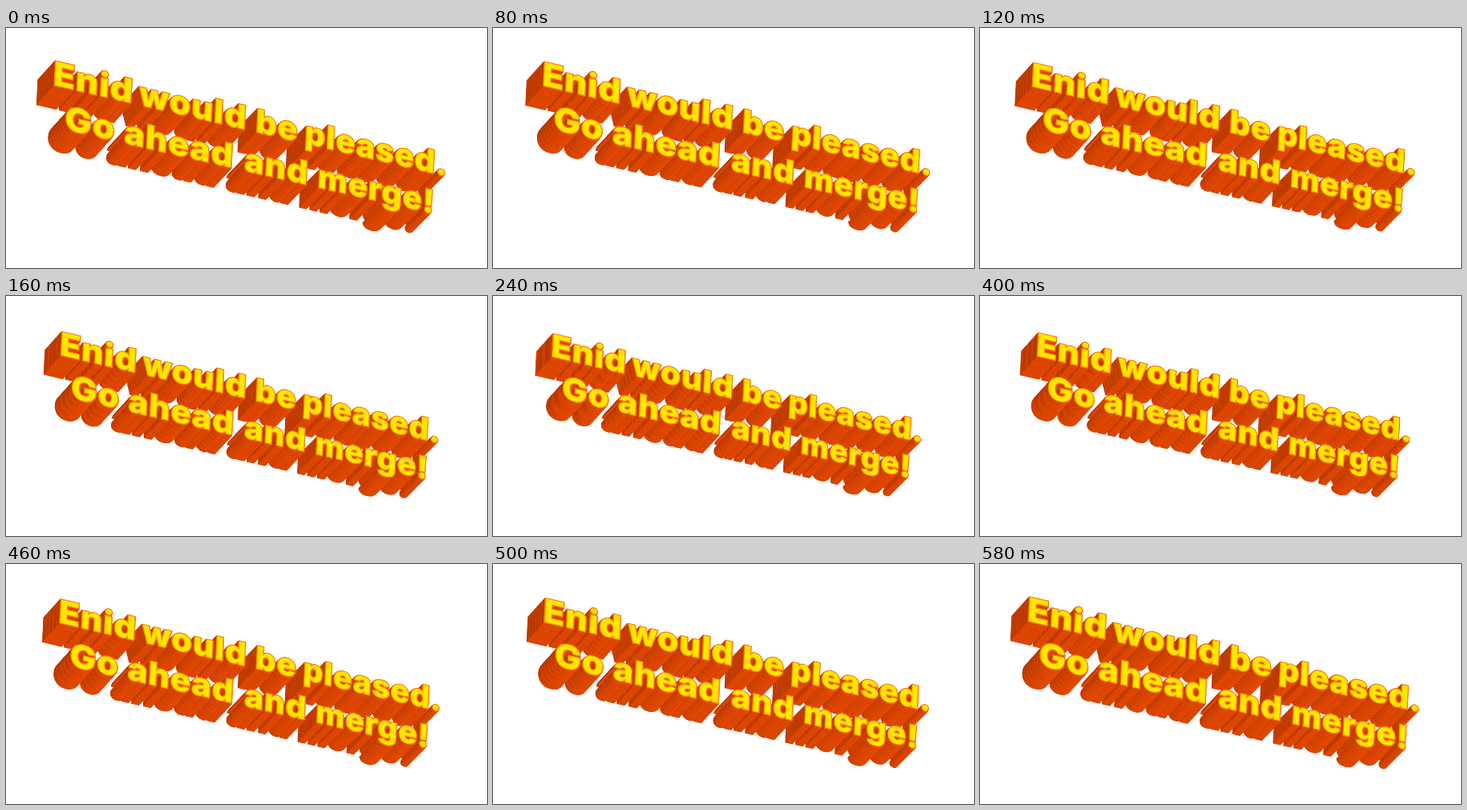
Animation of 600x300 px, one loop 0.6 s. Source, as an HTML page with a canvas:

```html
<!DOCTYPE html>
<html lang="en">
<head>
<meta charset="utf-8">
<title>Go ahead and merge!</title>
<style>
  html, body { margin: 0; width: 100%; height: 100%; overflow: hidden; background: #fff; }
  canvas { display: block; }
</style>
</head>
<body>
<canvas id="stage" width="600" height="300"></canvas>
<script>
const W = 600, H = 300;
const LOOP = 600, STEP = 20;
const LAYERS = 40;
const FACE = '#ffe600', RIM = '#fc8200', LIT = '#f45000', SHADE = '#a23200';

// Each line: baseline through (x0, y0) with a slope; words sit at their centres.
const lines = [
  { x0: 60, y0: 71, slope: 0.233,
    words: [['Enid', 108.5], ['would', 233], ['be', 337.5], ['pleased.', 461.5]] },
  { x0: 92, y0: 130.8, slope: 0.229,
    words: [['Go', 104.5], ['ahead', 215.5], ['and', 337], ['merge!', 461.5]] }
];

// Perspective: words get smaller and run deeper towards the right.
const words = lines.flatMap(({ x0, y0, slope, words }) => words.map(([text, x]) => {
  const k = (x - 60) / 480;
  return {
    text, x, slope,
    y: y0 + slope * (x - x0),
    wide: 1.12 - 0.15 * k,
    tall: 1.02 - 0.05 * k,
    dx: -21.5 - 3 * k,
    dy: 24.2
  };
}));

function drawWords(ctx, zoom, depth, shift, color, outline) {
  ctx.fillStyle = ctx.strokeStyle = color;
  ctx.lineWidth = outline;
  for (const w of words) {
    const x = w.x + w.dx * depth + shift;
    const y = w.y + w.dy * depth;
    const a = zoom * w.wide, d = zoom * w.tall;
    ctx.setTransform(a, a * w.slope, -0.05 * d, d,
      W / 2 + zoom * (x - W / 2), H / 2 + zoom * (y - H / 2));
    if (outline) ctx.strokeText(w.text, 0, 0);
    ctx.fillText(w.text, 0, 0);
  }
}

function render(zoom) {
  const canvas = document.createElement('canvas');
  canvas.width = W;
  canvas.height = H;
  const ctx = canvas.getContext('2d');
  ctx.fillStyle = '#fff';
  ctx.fillRect(0, 0, W, H);
  ctx.font = '800 40px Inter, sans-serif';
  ctx.letterSpacing = '1px';
  ctx.textAlign = 'center';
  ctx.lineJoin = 'miter';
  ctx.miterLimit = 3;
  // Stack from back to front; the lit copy moves right so left walls stay dark.
  for (let i = LAYERS; i > 0; i--) {
    drawWords(ctx, zoom, i / LAYERS, 0, SHADE, 2.5);
    drawWords(ctx, zoom, i / LAYERS, 0.42, LIT, 2.5);
  }
  drawWords(ctx, zoom, 0, 0, RIM, 2.5);
  drawWords(ctx, zoom, 0, 0, FACE, 0);
  return canvas;
}

const stage = document.getElementById('stage').getContext('2d');
const cache = new Map();
const start = performance.now();
let shown = -1;

function show(now) {
  const count = LOOP / STEP;
  const step = Math.floor(Math.max(0, now - start) / STEP) % count;
  if (step !== shown) {
    shown = step;
    const key = Math.min(step, count - step);
    if (!cache.has(key)) {
      const pulse = (1 - Math.cos(2 * Math.PI * key / count)) / 2;
      cache.set(key, render(1 - 0.062 * pulse));
    }
    stage.drawImage(cache.get(key), 0, 0);
  }
  requestAnimationFrame(show);
}
show(start);
</script>
</body>
</html>
```
